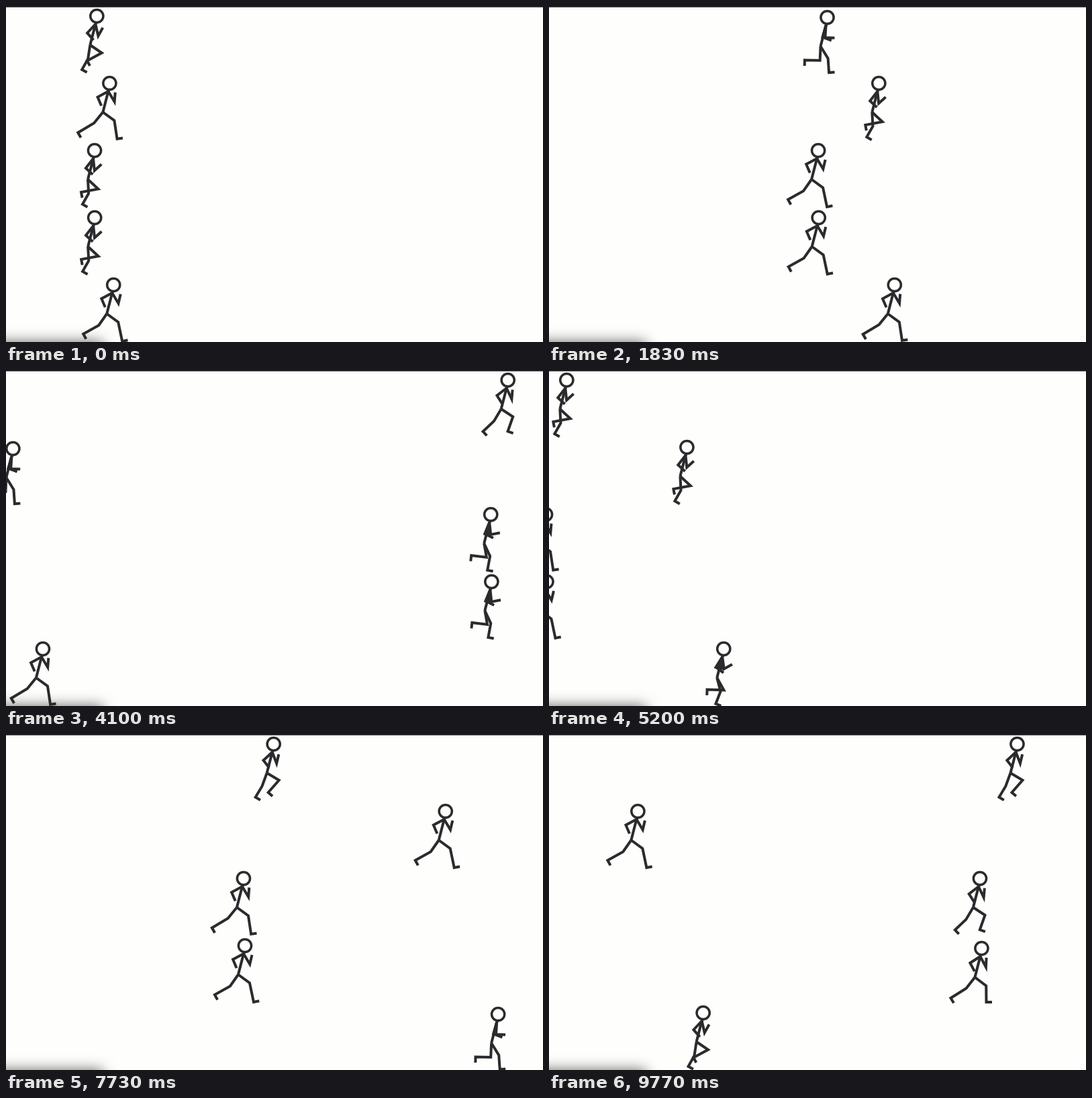
An HTML page with a canvas for the animation above (9.84 s loop, 800 by 500 pixels).

```html
<!DOCTYPE html>
<html lang="en">
<head>
<meta charset="utf-8">
<title>Runners</title>
<style>
  html, body { margin: 0; width: 100%; height: 100%; overflow: hidden; background: #fefefd; }
  canvas { display: block; }
</style>
</head>
<body>
<canvas id="stage" width="800" height="500"></canvas>
<script>
const ctx = document.getElementById('stage').getContext('2d');
const LOOP = 9840, INK = '#2b2b2d', PAPER = '#fefefd';

// Pixels per tick of 1/30 s; all set off together from START.
const SPEEDS = [4.899, 5.912, 4.722, 4.73, 6.222];
const START = 43.2, HEAD_START = 18.8, LAP = 883, LEFT = -30;

// One step lasts 59.9 px and shows 12 poses.
const STEP = 59.9, POSE_COUNT = 12;

// Closed paths of one limb over two steps; its twin is half a cycle away.
const THIGH = [65, 87, 110, 128, 125, 103, 80, 43, 31, 37, 36, 52];
const ANKLE_X = [-5, -18, -27, -46, -45, -38, -29, -20, -8, 7, 13, 9];
const ANKLE_Y = [98, 95, 94, 89, 88, 82, 76, 77, 87, 95, 99, 96];
const ELBOW = [112, 128, 137, 147, 152, 130, 84, 84, 69, 62, 59, 75];
const DIP = { 6: 4, 11: 2 };
const NECK = [-2, 27], HIP = [-10, 58];

// Smooth closed curve through the keys.
function along(keys, u) {
  const i = Math.floor(u), t = u - i;
  const [a, b, c, d] = [-1, 0, 1, 2].map(o => keys[(i + o + keys.length) % keys.length]);
  return b + t / 2 * (c - a + t * (2 * a - 5 * b + 4 * c - d + t * (3 * (b - c) + d - a)));
}

function polar([x, y], deg, len) {
  const a = deg * Math.PI / 180;
  return [x + Math.cos(a) * len, y + Math.sin(a) * len];
}

function line(...pts) {
  ctx.beginPath();
  pts.forEach(p => ctx.lineTo(...p));
  ctx.stroke();
}

function leg(u) {
  const knee = polar(HIP, along(THIGH, u), 21);
  const ankle = [along(ANKLE_X, u), along(ANKLE_Y, u)];
  const shin = Math.atan2(ankle[1] - knee[1], ankle[0] - knee[0]) * 180 / Math.PI;
  line(HIP, knee, ankle, polar(ankle, shin - 90, 8.5));
}

function arm(u) {
  const angle = along(ELBOW, u), elbow = polar(NECK, angle, 18);
  const bend = 85 + 65 * Math.max(0, Math.sin((u - 5.7) * Math.PI / 6));
  line(NECK, elbow, polar(elbow, angle - bend, 14));
  return { angle, elbow };
}

function drawRunner(x, y, pose) {
  const u = pose / 2, twin = u + 6;
  ctx.save();
  ctx.translate(x, y + (DIP[pose] || 0));
  ctx.lineWidth = 4;
  ctx.fillStyle = INK;
  line([0, 24], NECK, HIP);
  const rear = arm(u), front = arm(twin);
  if (rear.angle - front.angle < 40) {
    line(NECK, rear.elbow, front.elbow);
    ctx.fill();
  }
  leg(u);
  leg(twin);
  ctx.lineWidth = 3.5;
  ctx.fillStyle = PAPER;
  ctx.beginPath();
  ctx.arc(0, 15, 9.6, 0, 7);
  ctx.fill();
  ctx.stroke();
  ctx.restore();
}

function drawEdges() {
  ctx.fillStyle = INK;
  ctx.fillRect(0, 0, 800, 2);
  ctx.save();
  ctx.shadowColor = 'rgba(50, 50, 50, .75)';
  ctx.shadowBlur = 20;
  ctx.fillRect(-40, 500, 184, 30);
  ctx.restore();
}

function draw(ms) {
  const n = Math.floor((ms + 4) * 0.03);
  const ticks = HEAD_START + n + Math.min(2, n / 20);
  ctx.fillStyle = PAPER;
  ctx.fillRect(0, 0, 800, 500);
  ctx.strokeStyle = INK;
  SPEEDS.forEach((speed, row) => {
    const d = START + speed * ticks;
    const pose = Math.floor((d + 0.4) % STEP / STEP * POSE_COUNT);
    drawRunner((d - LEFT) % LAP + LEFT, row * 100, pose);
  });
  drawEdges();
}

const t0 = performance.now();
function frame() {
  draw((performance.now() - t0) % LOOP);
  requestAnimationFrame(frame);
}
frame();
</script>
</body>
</html>
```
